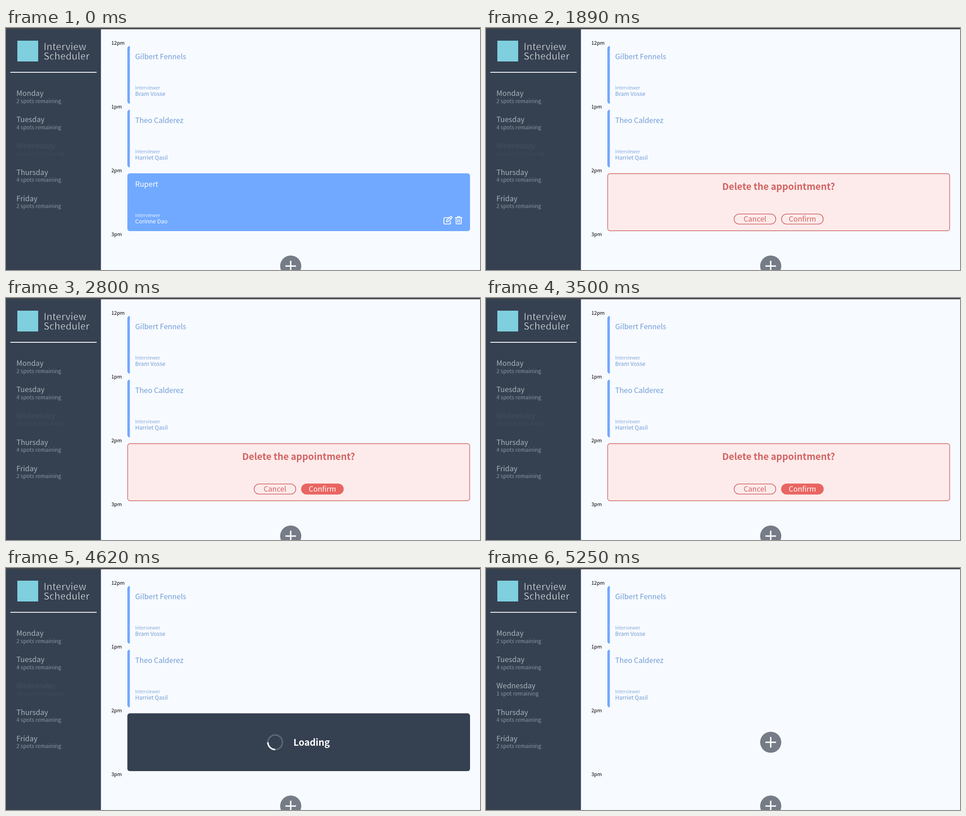
Recreate the animation shown at these times as an HTML page. Size 1046 by 535 pixels, loop 5390 ms.

```html
<!DOCTYPE html>
<html lang="en">
<head>
<meta charset="utf-8">
<title>Interview Scheduler</title>
<style>
  html, body { margin: 0; width: 100%; height: 100%; overflow: hidden; background: #f7faff; }
  svg { display: block; width: 100%; height: 100%; }
  text { font: 400 16px "Noto Sans CJK JP", "Noto Sans CJK SC", "Noto Sans", sans-serif; }
  /* A background-coloured outline thins the strokes to a light weight */
  .brand { font-size: 21.2px; fill: #fff; stroke: #354151; stroke-width: .7; letter-spacing: .15px; }
  .day { fill: #a9b1ba; }
  .spots { font-size: 11.95px; fill: #a9b1ba; stroke: #354151; stroke-width: .25; }
  .full text { fill: #454f5c; }
  .hour { font-size: 11px; fill: #000; }
  .label { font-size: 10.3px; fill-opacity: .85; }
  .person { font-size: 12.4px; }
  .muted { fill: #729dd5; }
  .light { fill: #fff; }
  .big { font-size: 20.4px; font-weight: 700; }
  .mid { text-anchor: middle; }
  .red { fill: #d26261; }
  .button { stroke: #cf6463; stroke-width: 1.5; fill: none; }
  .icon { fill: none; stroke: #fff; stroke-width: 1.8; stroke-linejoin: round; stroke-linecap: round; }
</style>
</head>
<body>
<svg id="stage" viewBox="0 0 1046 535"></svg>
<script>
const LOOP = 5390, FRAME = 70, SPIN = 1050, LOADING_AT = 3570;

// Start time of each state of the 2pm slot
const steps = [
  [0, "booked"],
  [1890, "confirm"],
  [2800, "confirm hover"],
  [LOADING_AT, "loading"],
  [4690, "empty"]
];

const text = (x, y, cls, str) => `<text x="${x}" y="${y}" class="${cls}">${str}</text>`;
const group = (when, body, cls = "") => `<g data-when="${when}" class="${cls}">${body}</g>`;
const card = (fill) => `<rect x="267.8" y="321.3" width="756.2" height="127.7" rx="5.5" fill="${fill}"/>`;

const day = (row, name, spots) =>
  text(23, 150 + row * 58.2, "day", name) + text(23, 165.6 + row * 58.2, "spots", spots);

const details = (top, student, interviewer, cls) =>
  text(285, top + 29.2, cls, student) +
  text(285, top + 96.2, "label " + cls, "Interviewer") +
  text(285, top + 110.6, "person " + cls, interviewer);

const booking = (top, student, interviewer) =>
  `<path d="M273.3 ${top}h-.3a5.2 5.2 0 0 0-5.2 5.2v117a5.2 5.2 0 0 0 5.2 5.2h.3z" fill="#72a8fb"/>` +
  details(top, student, interviewer, "muted");

const addButton = (y) =>
  `<circle cx="628.3" cy="${y}" r="23.3" fill="#757c87"/>
   <path d="M616.5 ${y}h23.6M628.3 ${y - 11.8}v23.6" stroke="#fff" stroke-width="3"/>`;

const pill = (x, cls, label, extra = "") =>
  `<rect x="${x}" y="411.2" width="92" height="22.4" rx="11.2" class="button" ${extra}/>` +
  text(x + 46, 428, "mid " + cls, label);

const icons = `<g class="icon">
  <path d="M977 419.3h-8.6a2 2 0 0 0-2 2v10a2 2 0 0 0 2 2h10.4a2 2 0 0 0 2-2v-4.2"/>
  <path d="M972 428.4l.6-3.6 8.2-8a1.6 1.6 0 0 1 2.2 0l.9.9a1.6 1.6 0 0 1 0 2.2l-8.2 8zM978.8 418.6l3.2 3.2"/>
  <path d="M991.7 419.4h14.6M995.6 419.2l1.2-2.4h4.4l1.2 2.4M993.3 419.6v11.8a1.8 1.8 0 0 0 1.8 1.8h7.8a1.8 1.8 0 0 0 1.8-1.8v-11.8M997.2 423v6.6M1000.8 423v6.6"/>
</g>`;

const sidebar = `
  <rect width="209.5" height="535" fill="#354151"/>
  <rect x="25" y="28" width="46" height="46" fill="#7fcfde"/>
  ${text(83, 48.8, "brand", "Interview")}${text(83, 70, "brand", "Scheduler")}
  <rect x="9.5" y="97" width="190.5" height="1.8" fill="#fff"/>
  ${day(0, "Monday", "2 spots remaining")}
  ${day(1, "Tuesday", "4 spots remaining")}
  ${group("booked confirm loading", day(2, "Wednesday", "no spots remaining"), "full")}
  ${group("empty", day(2, "Wednesday", "1 spot remaining"))}
  ${day(3, "Thursday", "4 spots remaining")}
  ${day(4, "Friday", "2 spots remaining")}`;

const booked = card("#70a9ff") + details(321.8, "Rupert", "Corinne Dao", "light") + icons;

const confirm = `
  <rect x="268.5" y="322" width="754.8" height="126.3" rx="5" fill="#fdebeb" stroke="#cf6665" stroke-width="1.4"/>
  ${text(645.8, 357.5, "big mid red", "Delete the appointment?")}
  ${pill(547.5, "red", "Cancel")}
  ${pill(652.2, "red", "Confirm")}`;

const hover = pill(652.2, "light", "Confirm", 'style="fill:#ea6560;stroke:#ea6560"');

const loading = card("#354151") + `
  <g fill="none" stroke="#fff" stroke-width="3.2">
    <circle cx="594" cy="385.3" r="16.1" stroke-opacity=".2"/>
    <path id="arc" d="M577.9 385.3a16.1 16.1 0 0 0 16.1 16.1"/>
  </g>` + text(634.2, 393, "big light", "Loading");

const stage = document.getElementById("stage");
stage.innerHTML = `
  <rect width="1046" height="535" fill="#f7faff"/>
  ${sidebar}
  <rect width="1046" height="2.8" fill="#45474d"/>
  ${["12pm", "1pm", "2pm", "3pm"].map((h, i) => text(232.5, 37.4 + i * 141, "hour", h)).join("")}
  ${booking(39.8, "Gilbert Fennels", "Bram Vosse")}
  ${booking(180.6, "Theo Calderez", "Harriet Qasil")}
  ${group("booked", booked)}
  ${group("confirm", confirm)}
  ${group("hover", hover)}
  ${group("loading", loading)}
  ${group("empty", addButton(385.2))}
  ${addButton(526.2)}`;

const groups = [...stage.querySelectorAll("[data-when]")]
  .map((node) => ({ node, when: node.dataset.when.split(" ") }));
const arc = document.getElementById("arc");

function draw(time) {
  const active = steps.filter(([at]) => at <= time).pop()[1].split(" ");
  for (const { node, when } of groups) {
    node.style.display = when.some((w) => active.includes(w)) ? "" : "none";
  }
  const turned = Math.floor((time - LOADING_AT) / FRAME) * FRAME / SPIN;
  arc.setAttribute("transform", `rotate(${turned * 360} 594 385.3)`);
}

const start = performance.now();
function tick() {
  draw((performance.now() - start) % LOOP);
  requestAnimationFrame(tick);
}
tick();
</script>
</body>
</html>
```
